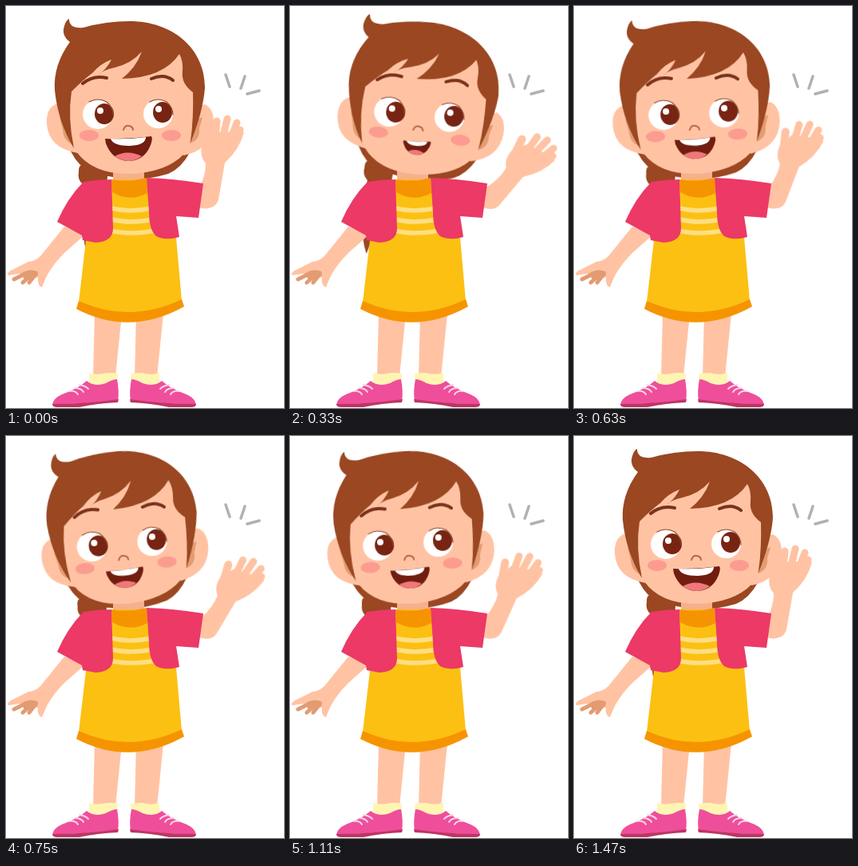
Animation, 348 px wide and 503 px high, one loop 1800 ms. Source, as an HTML page without scripts:

```html
<!DOCTYPE html>
<html lang="en">
<head>
<meta charset="utf-8">
<title>Waving girl</title>
<style>
  html, body { margin: 0; width: 100%; height: 100%; overflow: hidden; background: #fff; }
  svg { display: block; width: 100vw; height: 100vh; }

  .hair { fill: #9a4722; }
  .skin { fill: #ffc3a3; }
  .shade { fill: #e39b72; }
  .jacket { fill: #ec3966; }
  .orange { fill: #f69400; }
  .line { fill: none; stroke-linecap: round; stroke-linejoin: round; }

  .tilt, .arm, .eyes, .brows, .mouth {
    animation: 1800ms cubic-bezier(.37, 0, .63, 1) infinite;
  }
  .tilt  { transform-origin: 150px 228px; animation-name: tilt; }
  .arm   { transform-origin: 250px 238px; animation-name: wave; }
  .eyes  { transform-origin: 153px 132px; animation-name: blink; }
  .brows { transform-origin: 153px 91px;  animation-name: squeeze; }
  .mouth { transform-origin: 153px 174px; animation-name: talk; }

  @keyframes tilt {
    0%, 71.7%, 100% { transform: rotate(0deg); }
    11.9% { transform: rotate(6.5deg); }
    51.1% { transform: rotate(-6.3deg); }
  }
  @keyframes wave {
    0%, 81.7%, 100% { transform: rotate(0deg); }
    14.2% { transform: rotate(33deg); }
    32.5% { transform: rotate(10deg); }
    47.8% { transform: rotate(26.5deg); animation-timing-function: cubic-bezier(.3, 0, .8, .8); }
    61.7% { transform: rotate(14.3deg); animation-timing-function: ease-out; }
  }
  @keyframes blink {
    0%, 23.3%, 33.3%, 100% { transform: scaleY(1); }
    26.4%, 30.2% { transform: scaleY(0); }
  }
  @keyframes squeeze {
    0%, 22%, 34%, 100% { transform: scale(1); }
    26.4%, 30.2% { transform: scale(.8); }
  }
  @keyframes talk {
    0%, 81.7%, 100% { transform: scale(1); }
    14.2% { transform: scale(.55); }
    32.5% { transform: scale(.88); }
    48.3% { transform: scale(.75); }
  }
</style>
</head>
<body>
<svg viewBox="0 0 348 503" preserveAspectRatio="none">
  <defs>
    <g id="shoe">
      <path fill="#fff5b3" d="M104 459Q113 462 121 460T140 460L139 474H104Z"/>
      <path fill="#ef4e9b" d="M58 499Q59 491 70 486Q90 479 101 469Q110 477 125 472Q134 467 139 467Q142 482 140 495Z"/>
      <path fill="#bd3563" d="M58 498Q100 498 141 492L140 496Q115 497 92 502H64Q58 502 58 498Z"/>
      <path class="line" stroke="#fbd3e6" stroke-width="2" d="M80 482Q87 481 90 486M86 478Q94 478 97 483M92 474Q99 475 103 479"/>
    </g>
    <g id="pupil">
      <ellipse rx="12" ry="13" fill="#782413"/>
      <circle cx="-5" cy="-4" r="4" fill="#fff"/>
    </g>
  </defs>

  <!-- Hair behind the body -->
  <g class="tilt hair">
    <path d="M66 120Q72 184 98 203Q150 226 203 210Q236 196 246 130Z"/>
    <path d="M86 180Q90 192 99 196Q90 199 91 208Q89 217 96 223L98 285Q96 297 104 315L125 240L128 200Z"/>
  </g>

  <!-- Body -->
  <path class="skin" d="M73 276L43 313Q37 319 28 320L6 331Q0 335 3 337L16 335L40 340Q39 350 45 352Q48 344 52 336Q60 322 73 309L99 286Z"/>
  <path class="shade" d="M20 334Q30 328 39 332Q43 336 34 342L22 341Z"/>
  <path class="line" stroke="#e39b72" stroke-width="5" d="M26 334L10 342M32 336L21 346M36 337L29 346"/>
  <path class="skin" d="M111 385H145L137 464H109ZM163 385H197L189 464H161Z"/>
  <use href="#shoe"/>
  <use href="#shoe" transform="matrix(-1 0 0 1 296 0)"/>
  <path fill="#f5b08c" d="M134 202H173V222H134Z"/>
  <path fill="#fcc012" d="M132 217H177L213 290L220 369Q155 398 91 371L101 285Z"/>
  <path class="orange" d="M132 217Q154 221 176 215L177 234Q155 246 133 233Z"/>
  <path class="orange" d="M91 369Q155 398 220 367L223 376Q155 414 88 379Z"/>
  <path class="line" stroke="#ffde83" stroke-width="5.5" d="M132 253Q155 259 182 253M132 267Q155 273 184 267M130 281Q155 287 188 281"/>

  <!-- Head -->
  <g class="tilt">
    <path class="skin" d="M64 122Q50 127 51 147Q53 178 90 184V130ZM249 123Q261 129 260 149Q257 180 222 187V130Z"/>
    <path class="shade" d="M67 139Q82 140 87 174Q72 171 71 155ZM246 139Q233 142 230 172Q243 168 242 153Z"/>
    <path class="skin" d="M79 100Q77 160 88 182Q108 210 153 210Q200 209 223 185Q235 164 236 100L215 50H120Z"/>
    <path class="hair" d="M85 178Q65 145 61 105Q59 74 80 45Q69 37 73 25Q75 18 79 16Q79 29 97 27Q125 19 155 19C207 19 249 52 249 102Q247 131 231 171Q235 138 234 108Q219 97 221 82Q222 69 217 60Q197 90 145 91Q163 77 170 57Q157 72 136 77Q121 80 115 87Q127 78 132 67Q118 72 108 84Q98 91 82 107Q77 140 85 178Z"/>
    <g fill="#fc9c90">
      <ellipse cx="104" cy="162" rx="12" ry="7"/>
      <ellipse cx="207" cy="162" rx="12" ry="7"/>
    </g>
    <path class="brows line" stroke="#7b321b" stroke-width="4" d="M96 97Q109 86 126 90M182 91Q198 84 209 93"/>
    <g class="eyes">
      <ellipse cx="115" cy="135.5" rx="19" ry="18.5" fill="#fff"/>
      <ellipse cx="190.5" cy="135" rx="18.5" ry="18" fill="#fff"/>
      <use href="#pupil" x="123" y="135"/>
      <use href="#pupil" x="196" y="133"/>
      <path class="line" stroke="#8d4a30" stroke-width="1.2" d="M104 120Q115 114 126 120Q134 127 134 136M180 120Q190 114 201 120Q209 127 209 136"/>
    </g>
    <path class="line" stroke="#b96745" stroke-width="2" d="M147 155Q149 149 154 150Q159 151 159 155"/>
    <g class="mouth">
      <path fill="#711d10" d="M124 166Q153 167 182 163Q184 166 181 174Q173 194 153 194Q133 193 125 172Z"/>
      <path fill="#fff" d="M131 166Q154 167 175 164Q175 174 155 175Q134 175 131 166Z"/>
      <path fill="#f1787a" d="M136 188Q152 179 170 188Q162 194 153 194Q143 193 136 188Z"/>
    </g>
  </g>

  <!-- Waving arm -->
  <circle class="skin" cx="249" cy="239.5" r="14"/>
  <g class="arm">
    <path class="skin" d="M242 228Q250 212 250 197Q242 188 245 175L258 158L285 157L298 158Q292 180 274 196L266 242Q263 253 250 253Z"/>
    <g class="line" stroke="#ffc3a3" stroke-width="9">
      <path d="M261 175L264 144M270 170L277 141M279 172L289 146M282 177L293 155"/>
      <path stroke-width="10" d="M251 182L249 156"/>
    </g>
  </g>

  <!-- Jacket -->
  <path class="jacket" d="M97 220Q114 217 132 217L134 278Q134 295 112 296L96 293L95 287L64 270Q77 240 97 220Z"/>
  <path class="jacket" d="M176 215Q210 216 247 222L241 265L213 263L217 289Q200 294 188 288Q179 280 179 258Z"/>

  <path class="line" stroke="#b1b1b1" stroke-width="3.5" d="M275 86L280 101M299 88L294 103M302 110L317 106"/>
</svg>
</body>
</html>
```
